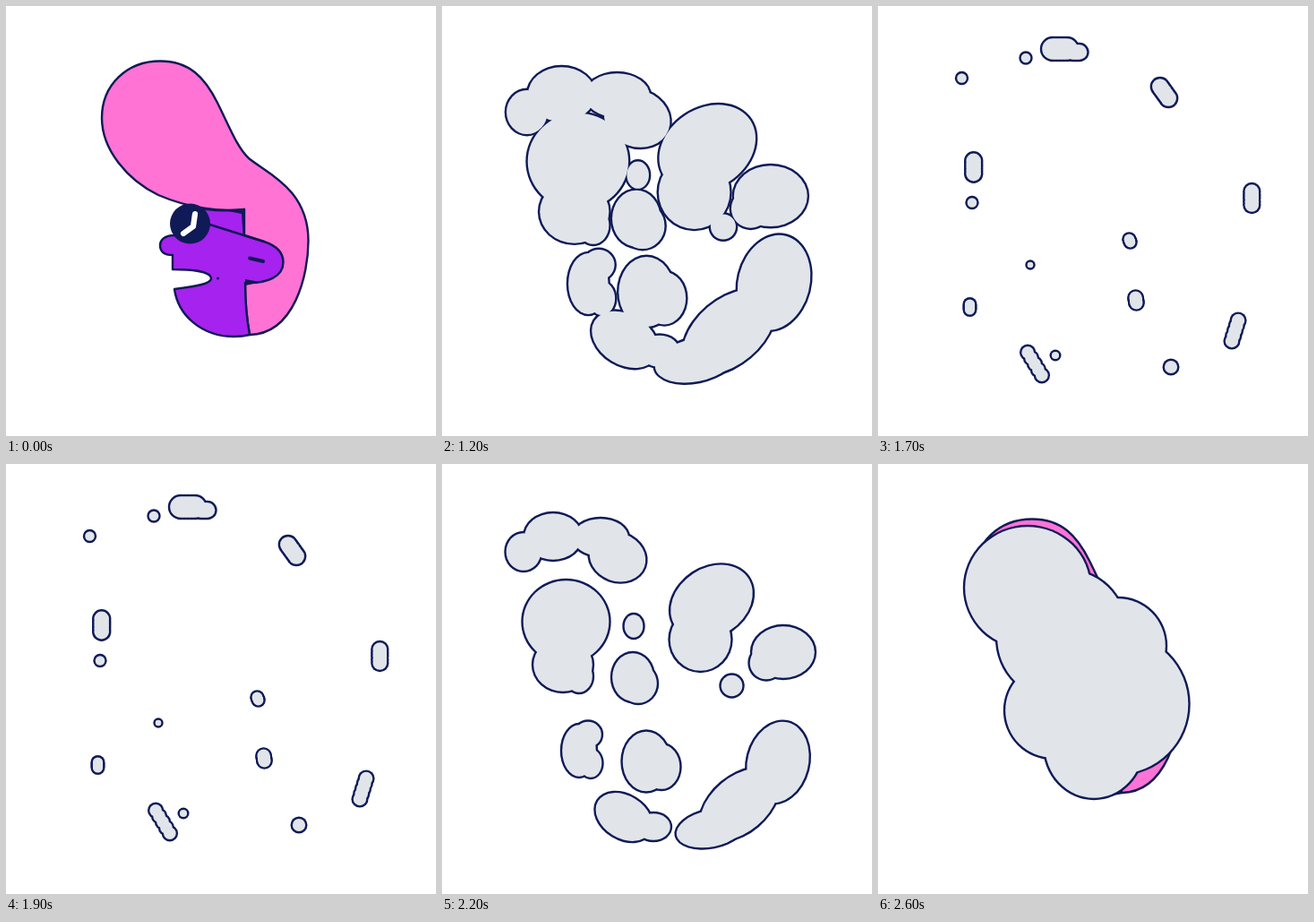
Animation of 480x480 px, one loop 2700 ms. Source, as an HTML page with a canvas:

```html
<!DOCTYPE html>
<html lang="en">
<head>
<meta charset="utf-8">
<title>Puff</title>
<style>
  html, body { margin: 0; width: 100%; height: 100%; overflow: hidden; background: #fff; }
  canvas { display: block; width: 480px; height: 480px; }
</style>
</head>
<body>
<canvas id="stage" width="480" height="480"></canvas>
<script>
const ctx = document.getElementById('stage').getContext('2d');
const NAVY = '#0f1a56', PINK = '#ff73d5', PURPLE = '#a622ee', SMOKE = '#e1e5ea';
const LINE = 2.4, HUB = { x: 250, y: 240 };
const LOOP = 2700, HOLD = 1000, STEP = 100;

const hair = new Path2D(`M266,227 C240,230 205,226 170,211 C135,194 107,160 107,125
  C107,88 135,61.5 172,61.5 C205,61.5 222,80 236,108 C249,134 258,158 271,170
  C290,186 337.5,204 337.5,262 C337.5,300 322,366 272,367 Q267,340 267,309`);
const face = new Path2D(`M200,222 L188,256 C176,256 172,262 172,267 C172,275 177,278 186,278
  L186,294 C205,294 229,296 229,304 C229,311 205,314 188,316 C192,345 218,369 255,369
  Q264,369 272,367 Q267,340 267,309 C292,310 309.5,302 309.5,286 C309.5,276 303,268 288,263
  L266,256 V227 Q232,231 200,222 Z`);
const shade = new Path2D('M248,229 L267,226 V257 L264.5,255 L263,232 Z M267,305 L284,308 L272,311 L267,312 Z');

// A puff is a union of lobes: ellipses with centre, radii and tilt.
const lobe = (x, y, rx, ry = rx, tilt = 0) => ({ x, y, rx, ry, tilt });

// A bean is a circle swept along a short line.
const bean = (x, y, half, r, angle = 0) => [-1, -0.5, 0, 0.5, 1].map(k =>
  lobe(x + k * half * Math.cos(angle), y + k * half * Math.sin(angle), r));

const cloud = [
  lobe(167, 138, 71, 69), lobe(205, 190, 75, 71, -0.8), lobe(268, 203, 54),
  lobe(268.5, 268, 79), lobe(241, 314, 56, 60), lobe(195, 275, 54)
];

const puffs = [
  [lobe(91, 98, 20.5, 22), lobe(124, 81, 33, 27), lobe(177, 82, 32, 22), lobe(196, 104, 33, 28, 0.35)],
  [lobe(138.5, 176, 49, 47), lobe(135, 224, 34, 31), lobe(153, 237, 16, 19)],
  [lobe(214, 181, 11.5, 14)],
  [lobe(213, 238, 24, 28), lobe(219, 245, 22, 23)],
  [lobe(301, 154, 50, 39, -0.58), lobe(288.5, 196, 35, 36)],
  [lobe(381, 210, 36, 30), lobe(362, 222, 19.5)],
  [lobe(323.5, 247.5, 13)],
  [lobe(153, 320, 20, 30), lobe(163, 302, 16, 15.5), lobe(166, 334, 13.5, 17)],
  [lobe(228, 332, 27.5, 34.5), lobe(245, 338, 21.5, 26)],
  [lobe(203, 394, 35, 25, 0.55), lobe(236, 405, 20, 16)],
  [lobe(375, 333, 35, 47, 0.25), lobe(332, 380, 52, 32, -0.7), lobe(300, 407, 40, 21.5, -0.2)]
];

const UPRIGHT = Math.PI / 2;
const wisps = [
  [...bean(203, 48, 8, 13), ...bean(221, 51.5, 4, 9.5)],
  bean(319.5, 96.5, 8, 10, 0.95),
  bean(106.7, 180, 7.2, 9.5, UPRIGHT),
  bean(417.3, 214.5, 7.5, 9, UPRIGHT),
  bean(102.5, 336, 3, 6.8, UPRIGHT),
  bean(398.5, 362.5, 12, 8.4, 1.87),
  bean(175, 399.5, 15, 8, 1.02),
  bean(281, 262, 1.8, 6.9, 1.2),
  bean(288, 328.5, 3, 8.2, 1.42),
  [lobe(165, 58, 6.5)], [lobe(93.5, 80.5, 6.5)], [lobe(105, 219.5, 6.5)],
  [lobe(170, 289, 4.5)], [lobe(198, 390, 5.3)], [lobe(327, 403, 8.3)]
];

function stroke(width, color, ...points) {
  ctx.beginPath();
  points.forEach(([x, y]) => ctx.lineTo(x, y));
  ctx.lineWidth = width;
  ctx.strokeStyle = color;
  ctx.stroke();
}

function fillLobe(l, color, grow = 0) {
  ctx.beginPath();
  ctx.ellipse(l.x, l.y, l.rx + grow, l.ry + grow, l.tilt, 0, 2 * Math.PI);
  ctx.fillStyle = color;
  ctx.fill();
}

function paint(path, color) {
  ctx.fillStyle = color;
  ctx.fill(path);
  ctx.lineWidth = LINE;
  ctx.strokeStyle = NAVY;
  ctx.stroke(path);
}

function drawHead() {
  paint(hair, PINK);
  paint(face, PURPLE);
  ctx.fillStyle = NAVY;
  ctx.fill(shade);
  stroke(LINE, NAVY, [226, 243.5], [288, 263]);
  fillLobe(lobe(205.5, 243, 22.5), NAVY);
  stroke(6.2, '#fff', [211, 232], [209, 246], [198, 254]);
  stroke(4, NAVY, [272, 281.5], [287, 285]);
  fillLobe(lobe(236.5, 304, 1.5), NAVY);
}

// One shared outline around all overlapping lobes.
function drawSmoke(lobes) {
  lobes.forEach(l => fillLobe(l, NAVY, LINE / 2));
  lobes.forEach(l => fillLobe(l, SMOKE, -LINE / 2));
}

// Moves a puff away from the hub and resizes it about its own centre.
function place(puff, spread, size) {
  const mean = k => puff.reduce((sum, l) => sum + l[k], 0) / puff.length;
  const cx = mean('x'), cy = mean('y');
  return puff.map(l => lobe(
    HUB.x + (cx - HUB.x) * spread + (l.x - cx) * size,
    HUB.y + (cy - HUB.y) * spread + (l.y - cy) * size,
    l.rx * size, l.ry * size, l.tilt));
}

const burst = (puffSet, spread, size) => puffSet.flatMap(p => place(p, spread, size));

const poses = [
  () => { drawHead(); drawSmoke(cloud); },
  () => drawSmoke([...place(cloud, 1, 1.04), ...burst(puffs, 0.8, 1.2)]),
  () => drawSmoke(burst(puffs, 0.87, 1.17)),
  () => drawSmoke(burst(puffs, 0.95, 1.06)),
  () => drawSmoke(burst(puffs, 1, 1)),
  () => drawSmoke(burst(puffs, 1.1, 0.75)),
  () => drawSmoke(burst(wisps, 0.95, 1.5)),
  () => drawSmoke(burst(wisps, 1, 1)),
  () => drawSmoke(burst(wisps, 1.09, 0.67))
];

// The smoke bursts outward, then plays back the same way.
function draw(t) {
  ctx.fillStyle = '#fff';
  ctx.fillRect(0, 0, 480, 480);
  if (t < HOLD) return drawHead();
  const last = poses.length - 1;
  poses[last - Math.abs(last - Math.floor((t - HOLD) / STEP))]();
}

ctx.lineCap = ctx.lineJoin = 'round';
const start = performance.now();
function run() {
  draw((performance.now() - start) % LOOP);
  requestAnimationFrame(run);
}
run();
</script>
</body>
</html>
```
